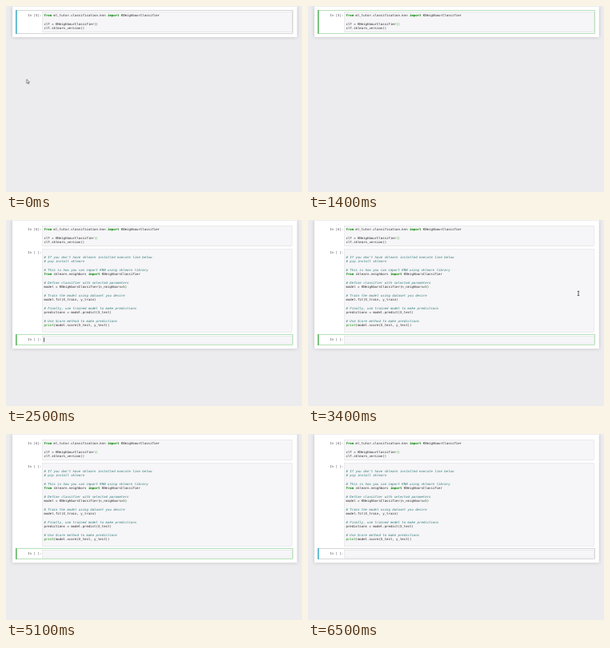
An HTML page for the animation above (6.6 s loop, 370x233 px).

```html
<!DOCTYPE html>
<html lang="en">
<head>
<meta charset="utf-8">
<title>Notebook</title>
<style>
html, body { margin: 0; height: 100%; overflow: hidden; background: #ecebee; }
svg { display: block; width: 370px; height: 233px; }
text {
  font: 4px "DejaVu Sans Mono", monospace;
  text-rendering: geometricPrecision;
  fill: #2a2a2a;
}
.prompt { fill: #55555c; text-anchor: end; }
.kw { font-weight: bold; fill: #008000; }
.fn, .num { fill: #008000; }
.com { font-style: italic; fill: #2f7c7c; }
.page { fill: #fff; filter: drop-shadow(0 0 2px rgba(87, 87, 87, .3)); }
.input { fill: #f6f5f7; stroke: #d3d2d5; stroke-width: .4; }
.frame { fill: #fff; stroke-width: .6; }
.command .frame { stroke: #b9b9bc; }
.command .bar { fill: #4db4cb; }
.edit .frame { stroke: #86ca89; }
.edit .bar { fill: #66bb6a; }
.caret { fill: #111; }

/* One loop is 6.6 s; every change is a hard step. */
.before, .after, .idle1, .edit1, .edit3, .idle3, .bracket, .caret1, .caret3, .mouse, .arrow, .beam {
  animation: 6.6s step-end infinite;
}
.before { animation-name: before; }
.after { animation-name: after; }
.idle1 { animation-name: idle1; }
.edit1 { animation-name: edit1; }
.edit3 { animation-name: edit3; }
.idle3 { animation-name: idle3; }
.bracket { animation-name: bracket; }
.caret1 { animation-name: caret1; }
.caret3 { animation-name: caret3; }
.mouse { animation-name: mouse; }
.arrow { animation-name: arrow; }
.beam { animation-name: beam; }

@keyframes before { 0% { opacity: 1 } 37.87%, 100% { opacity: 0 } }
@keyframes after { 0% { opacity: 0 } 37.87%, 100% { opacity: 1 } }
@keyframes idle1 { 0% { opacity: 1 } 12.12%, 100% { opacity: 0 } }
@keyframes edit1 { 0% { opacity: 0 } 12.12% { opacity: 1 } 37.87%, 100% { opacity: 0 } }
@keyframes edit3 { 0% { opacity: 1 } 98.48%, 100% { opacity: 0 } }
@keyframes idle3 { 0% { opacity: 0 } 98.48%, 100% { opacity: 1 } }
@keyframes bracket { 0% { fill: #2a2a2a } 12.12%, 100% { fill: #1ea01e } }
@keyframes caret1 {
  0%, 21.21%, 36.36%, 100% { opacity: 0 }
  12.12%, 28.78% { opacity: 1 }
}
@keyframes caret3 {
  0%, 45.45%, 62.12%, 77.27%, 93.93%, 100% { opacity: 0 }
  37.87%, 54.54%, 69.69%, 86.36% { opacity: 1 }
}
@keyframes mouse {
  0% { transform: translate(25.8px, 91.8px) }
  1.51% { transform: translate(29px, 84px) }
  3.03% { transform: translate(44px, 62px) }
  4.54% { transform: translate(72px, 36px) }
  6.06% { transform: translate(108px, 12px) }
  7.57% { transform: translate(134px, 3px) }
  9.09% { transform: translate(137px, 11px) }
  10.6% { transform: translate(130.4px, 21.3px) }
  13.63% { transform: translate(131px, 26px) }
  15.15% { transform: translate(134px, 42px) }
  16.66% { transform: translate(137px, 53px) }
  18.18% { transform: translate(-20px, -20px) }
  50% { transform: translate(359px, 110px) }
  51.51% { transform: translate(338px, 92px) }
  53.03% { transform: translate(302px, 72px) }
  54.54% { transform: translate(260px, 56px) }
  56.06% { transform: translate(222px, 49px) }
  57.57% { transform: translate(192px, 52px) }
  59.09% { transform: translate(174px, 61px) }
  60.6% { transform: translate(126px, 112px) }
  62.12% { transform: translate(81.2px, 153.8px) }
  63.63% { transform: translate(81px, 150px) }
  65.15% { transform: translate(84px, 140px) }
  66.66% { transform: translate(90px, 126px) }
  68.18% { transform: translate(96px, 113px) }
  69.69% { transform: translate(99.5px, 103px) }
  71.21% { transform: translate(104px, 106px) }
  74.24% { transform: translate(112px, 118px) }
  75.75% { transform: translate(41px, 140px) }
  77.27%, 100% { transform: translate(-20px, -20px) }
}
@keyframes arrow {
  0%, 15.15%, 75.75%, 100% { opacity: 1 }
  6.06%, 50% { opacity: 0 }
  7.57% { opacity: 1 }
  9.09% { opacity: 0 }
}
@keyframes beam {
  0%, 15.15%, 75.75%, 100% { opacity: 0 }
  6.06%, 50% { opacity: 1 }
  7.57% { opacity: 0 }
  9.09% { opacity: 1 }
}
</style>
</head>
<body>
<svg viewBox="0 0 370 233">
  <defs>
    <g id="cell1">
      <rect class="frame" x="12.3" y="5.3" width="346.4" height="29"/>
      <rect class="bar" x="12" y="5" width="1.7" height="29.6"/>
    </g>
    <g id="cell3">
      <rect class="frame" x="12.3" y="143.5" width="346.4" height="13.2"/>
      <rect class="bar" x="12" y="143.2" width="1.7" height="13.8"/>
    </g>
  </defs>

  <g class="before">
    <rect class="page" x="8" y=".4" width="355.8" height="38.6"/>
    <g class="idle1 command"><use href="#cell1" class="command"/>
      <rect class="frame" x="12.3" y="5.3" width="346.4" height="29"/>
      <rect class="bar" x="12" y="5" width="1.7" height="29.6"/>
    </g>
    <g class="edit1 edit">
      <rect class="frame" x="12.3" y="5.3" width="346.4" height="29"/>
      <rect class="bar" x="12" y="5" width="1.7" height="29.6"/>
    </g>
    <text class="prompt" x="44.2" y="13.4">In [5]:</text>
  </g>

  <g class="after">
    <rect class="page" x="8" y=".4" width="355.8" height="160.8"/>
    <g class="edit3 edit">
      <rect class="frame" x="12.3" y="143.5" width="346.4" height="13.2"/>
      <rect class="bar" x="12" y="143.2" width="1.7" height="13.8"/>
    </g>
    <g class="idle3 command">
      <rect class="frame" x="12.3" y="143.5" width="346.4" height="13.2"/>
      <rect class="bar" x="12" y="143.2" width="1.7" height="13.8"/>
    </g>
    <rect class="input" x="45.7" y="36.6" width="311.6" height="103.6"/>
    <rect class="input" x="45.7" y="145.4" width="311.6" height="9.6"/>
    <text class="prompt" x="44.2" y="13.4">In [6]:</text>
    <text class="prompt" x="44.2" y="42.4">In [ ]:</text>
    <text class="prompt" x="44.2" y="151.4">In [ ]:</text>
    <g transform="translate(47.5 0)">
      <text class="com" y="47.7"># If you don't have sklearn installed execute line below</text>
      <text class="com" y="53.1"># pip install sklearn</text>
      <text class="com" y="63.7"># This is how you can import KNN using sklearn library</text>
      <text y="69.1"><tspan class="kw">from</tspan> sklearn.neighbors <tspan class="kw">import</tspan> KNeighborsClassifier</text>
      <text class="com" y="79.7"># Define classifier with selected parameters</text>
      <text y="85.1">model = KNeighborsClassifier(n_neighbors=<tspan class="num">5</tspan>)</text>
      <text class="com" y="95.7"># Train the model using dataset you desire</text>
      <text y="101.1">model.fit(X_train, y_train)</text>
      <text class="com" y="111.7"># Finally, use trained model to make predictions</text>
      <text y="117.1">predictions = model.predict(X_test)</text>
      <text class="com" y="127.7"># Use Score method to make predictions</text>
      <text y="133.1"><tspan class="fn">print</tspan>(model.score(X_test, y_test))</text>
    </g>
    <rect class="caret caret3" x="47.2" y="147.4" width=".7" height="5.3"/>
  </g>

  <rect class="input" x="45.7" y="7.3" width="311.6" height="25.4"/>
  <g transform="translate(47.5 0)">
    <text y="13.4"><tspan class="kw">from</tspan> ml_tutor.classification.knn <tspan class="kw">import</tspan> KNeighbourClassifier</text>
    <text y="24.1">clf = KNeighbourClassifier<tspan class="bracket">()</tspan></text>
    <text y="29.4">clf.sklearn_version()</text>
  </g>
  <rect class="caret caret1" x="114.8" y="20.2" width=".7" height="5.3"/>

  <g class="mouse">
    <path class="arrow" d="M0 0V5L1.2 4L2 5.8L2.8 5.4L2 3.7H3.6Z" fill="#fff" stroke="#222" stroke-width=".5"/>
    <path class="beam" d="M-1.2-2.6H1.2M0-2.6V2.6M-1.2 2.6H1.2" fill="none" stroke="#222" stroke-width=".7"/>
  </g>
</svg>
</body>
</html>
```
